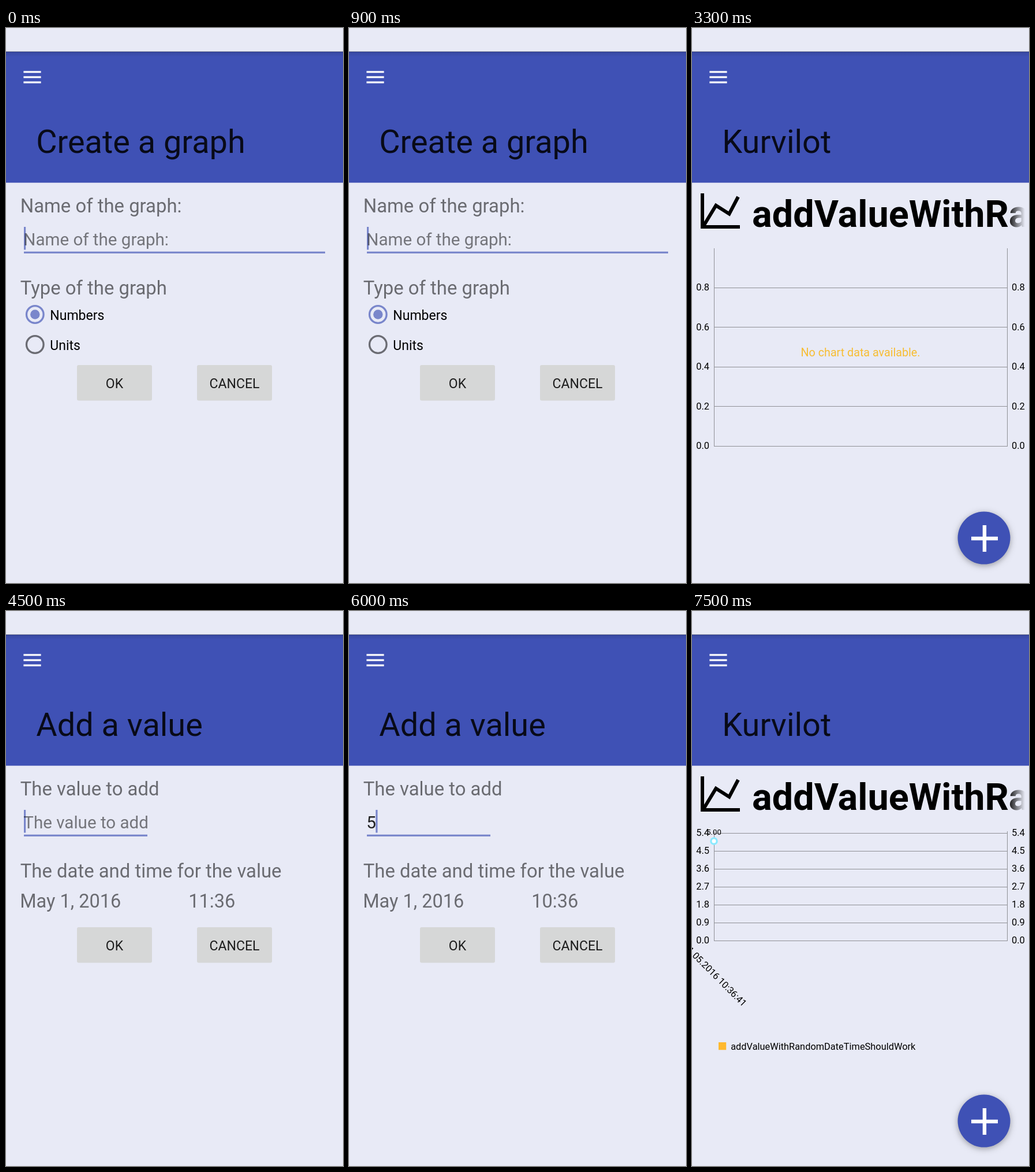
An HTML page with a canvas that plays this animation: 584x960 px, repeating every 9000 ms.

```html
<!DOCTYPE html>
<html lang="en">
<head>
<meta charset="utf-8">
<title>Graph app</title>
<style>
html, body { margin: 0; width: 100%; height: 100%; overflow: hidden; background: #e8eaf6; }
canvas { display: block; width: 584px; height: 960px; }
</style>
</head>
<body>
<canvas id="stage" width="584" height="960"></canvas>
<script>
const ctx = document.getElementById('stage').getContext('2d');
const DP = 1.643;
const BG = '#e8eaf6', BLUE = '#3f51b5', ACCENT = '#7986cb';
const LABEL = 'rgba(0,0,0,0.54)', HINT = 'rgba(0,0,0,0.5)', INK = 'rgba(0,0,0,0.87)';
const LOOP = 9000;

function text(str, x, y, sp, color, align = 'left', weight = 400) {
  ctx.font = `${weight} ${sp * DP}px Roboto, sans-serif`;
  ctx.textAlign = align;
  ctx.fillStyle = color;
  ctx.fillText(str, x, y);
}

function rect(x, y, w, h, color) {
  ctx.fillStyle = color;
  ctx.fillRect(x, y, w, h);
}

function disc(x, y, r, color) {
  ctx.fillStyle = color;
  ctx.beginPath();
  ctx.arc(x, y, r, 0, Math.PI * 2);
  ctx.fill();
}

function path(points, width, color) {
  ctx.lineWidth = width;
  ctx.strokeStyle = color;
  ctx.beginPath();
  points.forEach(([x, y]) => ctx.lineTo(x, y));
  ctx.stroke();
}

function header(title) {
  rect(0, 0, 584, 960, BG);
  rect(0, 41, 584, 226.6, BLUE);
  const shade = ctx.createLinearGradient(0, 40, 0, 50);
  shade.addColorStop(0, 'rgba(0,0,0,0.28)');
  shade.addColorStop(0.3, 'rgba(0,0,0,0.09)');
  shade.addColorStop(1, 'rgba(0,0,0,0)');
  rect(0, 40, 584, 10, shade);
  for (let i = 0; i < 3; i++) rect(30.4, 74.4 + i * 9, 30.2, 3.2, '#fff');
  text(title, 52.2, 216, 34, INK);
}

function button(label, x, y) {
  ctx.fillStyle = '#d6d7d7';
  ctx.beginPath();
  ctx.roundRect(x, y, 130, 61.5, 3);
  ctx.fill();
  text(label, x + 65, y + 40, 14, INK, 'center');
}

function buttons(y) {
  button('OK', 123, y);
  button('CANCEL', 331, y);
}

function field(value, color, right, caret) {
  rect(31, 386.7, right - 31, 3.2, ACCENT);
  rect(caret, 344, 3.2, 39.5, ACCENT);
  text(value, 30.3, 375.7, 18, color);
}

function radio(label, y, on) {
  const color = on ? ACCENT : '#6b6c73';
  ctx.lineWidth = 3.3;
  ctx.strokeStyle = color;
  ctx.beginPath();
  ctx.arc(50.3, y, 14.8, 0, Math.PI * 2);
  ctx.stroke();
  if (on) disc(50.3, y, 8.2, color);
  text(label, 76.3, y + 9, 14, '#000');
}

function createForm() {
  header('Create a graph');
  text('Name of the graph:', 24.7, 319, 20, LABEL);
  field('Name of the graph:', HINT, 553, 31);
  text('Type of the graph', 24.7, 461, 20, LABEL);
  radio('Numbers', 495.5, true);
  radio('Units', 547.5, false);
  buttons(583);
}

function valueForm(value, time) {
  header('Add a value');
  text('The value to add', 24.7, 319, 20, LABEL);
  if (value) field(value, INK, 245, 46.3);
  else field('The value to add', HINT, 245, 31);
  text('The date and time for the value', 24.7, 461, 20, LABEL);
  text('May 1, 2016', 24.2, 513, 19.8, LABEL);
  text(time, 316.3, 513, 19.8, LABEL);
  buttons(547);
}

function addButton() {
  ctx.save();
  ctx.shadowColor = 'rgba(0,0,0,0.35)';
  ctx.shadowBlur = 11;
  ctx.shadowOffsetY = 2.5;
  disc(506, 882.1, 45.5, BLUE);
  ctx.restore();
  rect(484, 879.8, 46, 6.4, '#fff');
  rect(503.7, 860, 6.4, 46, '#fff');
}

// Axes with evenly spaced rows, counted up from the bottom line.
function axes(bottom, rowGap, rows, step) {
  for (let i = 0; i < rows; i++) {
    const y = bottom - i * rowGap;
    const label = (i * step).toFixed(1);
    rect(38, Math.floor(y), 509, 1, '#8f9096');
    text(label, 30, y + 5.3, 10, '#000', 'right');
    text(label, 554, y + 5.3, 10, '#000');
  }
  for (const x of [38, 546]) rect(x, 381, 1, bottom - 380, '#8f9096');
}

function chartPage(drawChart) {
  header('Kurvilot');
  path([[18, 286], [18, 344], [83, 344]], 6, '#000');
  path([[19, 344], [41.5, 307], [64.5, 321.5], [80, 292]], 6, '#000');
  const fade = ctx.createLinearGradient(547, 0, 577, 0);
  fade.addColorStop(0, '#000');
  fade.addColorStop(1, 'rgba(0,0,0,0)');
  text('addValueWithRandom', 104, 344, 39.4, fade, 'left', 700);
  drawChart();
  addButton();
}

function emptyChart() {
  axes(723, 68.5, 5, 0.2);
  text('No chart data available.', 292, 567.7, 12, '#f7bd33', 'center');
}

function valueChart() {
  axes(570, 31, 7, 0.9);
  disc(38, 398, 6.8, '#8ceaff');
  disc(38, 398, 3.5, '#fff');
  text('5.00', 38, 387, 8, '#000', 'center');
  ctx.save();
  ctx.translate(87.8, 685);
  ctx.rotate(Math.PI / 4);
  text('01.05.2016 10:36:41', 0, 0, 9.8, '#000', 'right');
  ctx.restore();
  rect(46, 746, 13.2, 13.2, '#ffb92f');
  text('addValueWithRandomDateTimeShouldWork', 67.2, 759, 9.97, '#000');
}

const scenes = [
  [1500, createForm],
  [4500, () => chartPage(emptyChart)],
  [6000, () => valueForm('', '11:36')],
  [7500, () => valueForm('5', '10:36')],
  [LOOP, () => chartPage(valueChart)]
];

const start = performance.now();
function tick() {
  const t = (performance.now() - start) % LOOP;
  scenes.find(([end]) => t < end)[1]();
  requestAnimationFrame(tick);
}
tick();
</script>
</body>
</html>
```
